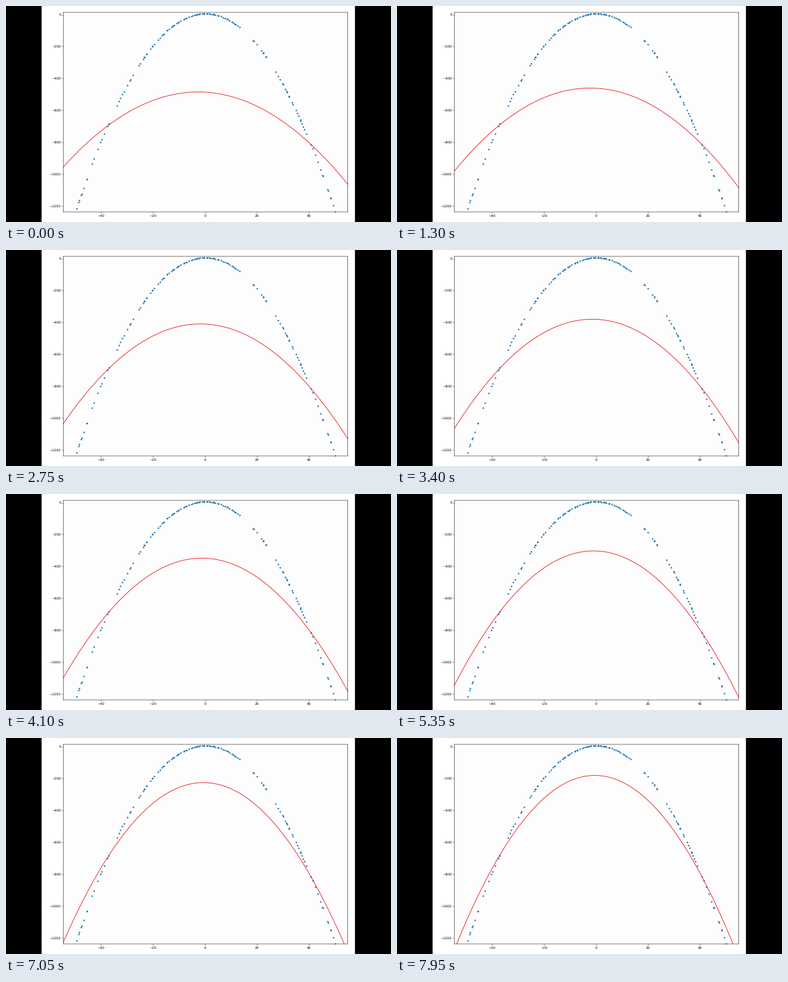
Recreate the animation shown at these times as a matplotlib script. Size 600x338 px, loop 8 s.

```python
import numpy as np
import matplotlib.pyplot as plt
from matplotlib.animation import FuncAnimation
from matplotlib.patches import Rectangle

W, H, DPI = 600, 338, 100
FRAMES, STEP = 160, 50
K = 0.3754                      # plot shrunk from default matplotlib sizes

plt.rcParams.update({
    "font.family": "DejaVu Sans",
    "text.hinting": "none",
    "axes.linewidth": K,
})

LEFT, RIGHT, TOP, BOTTOM = 89.2, 532.7, 10.0, 322.1
X0, Y0 = 310.1, 13.5            # pixel position of the data origin
SX, SY = 4.058, 0.2492          # pixels per data unit

# Coefficients of the fitted parabola, first and last
START = np.array([-0.1756, -0.915, -487.0])
END = np.array([-0.3756, -0.337, -181.0])

# Fit progress at a few moments (seconds)
KEY_T = [0, 1.3, 2.75, 4.1, 5.35, 7.05, 7.95]
KEY_P = [0, 0.081, 0.249, 0.451, 0.6, 0.853, 1]

# Stretches of x without samples
GAPS = [(-45, -43.3), (-36.3, -34.2), (-27.2, -25.7), (-19.1, -18.1),
        (13.3, 14.9), (15.2, 18.1), (19.9, 21.5), (24.3, 26.1),
        (39.4, 40.5), (46, 47)]


def sample_x(count=190):
    """Evenly spread, jittered positions, leaving the gaps empty."""
    rng = np.random.default_rng(4)
    x = np.linspace(-49.4, 50, count)
    x[1:-1] += rng.uniform(-0.4, 0.4, count - 2)
    keep = np.ones(count, bool)
    for lo, hi in GAPS:
        keep &= (x < lo) | (x > hi)
    # Thin out at random, more strongly away from the top
    keep &= rng.random(count) < 0.95 - 0.004 * np.abs(x)
    return x[keep]


fig = plt.figure(figsize=(W / DPI, H / DPI), dpi=DPI, facecolor="black")
fig.add_artist(Rectangle((55.5 / W, 0), 488.3 / W, 1, color="white", lw=0,
                         zorder=-1, snap=False))

ax = fig.add_axes([LEFT / W, 1 - BOTTOM / H,
                   (RIGHT - LEFT) / W, (BOTTOM - TOP) / H],
                  facecolor="#fdfdfd")
ax.set_xlim((LEFT - X0) / SX, (RIGHT - X0) / SX)
ax.set_ylim((Y0 - BOTTOM) / SY, (Y0 - TOP) / SY)
ax.set_xticks(range(-40, 41, 20))
ax.set_yticks(range(-1200, 1, 200))
ax.tick_params(labelsize=10 * K, length=3.5 * K, width=K, pad=3.5 * K)
for spine in ax.spines.values():
    spine.set_snap(False)

xs = sample_x()
ax.scatter(xs, np.polyval([-0.5, 0.1, 6], xs), s=(2.4 * 72 / DPI) ** 2,
           color="#1a70ab", linewidths=0)

grid = np.linspace(-56, 56, 300)
curve, = ax.plot([], [], color="#e81818", lw=1.7 * K)


def update(frame):
    p = np.interp(frame * STEP / 1000, KEY_T, KEY_P)
    curve.set_data(grid, np.polyval(START + (END - START) * p, grid))
    return curve,


anim = FuncAnimation(fig, update, frames=FRAMES, interval=STEP,
                     repeat=True, repeat_delay=0)
plt.show()
```
